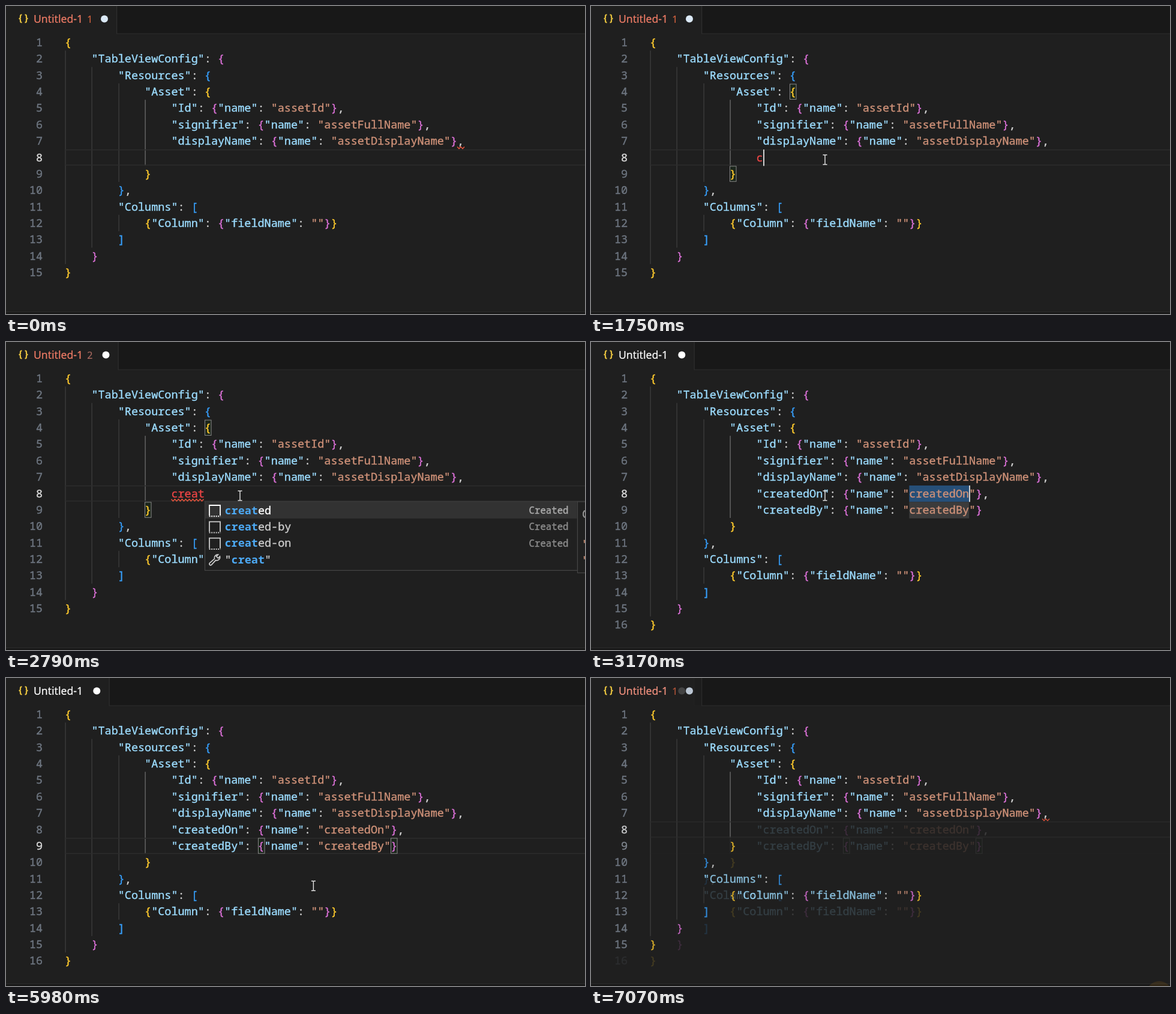
These frames come from a looping animation (965x513 px, 7.14 s). An HTML page:

```html
<!DOCTYPE html>
<html lang="en">
<head>
<meta charset="utf-8">
<title>Snippet completion</title>
<style>
html, body { margin: 0; height: 100%; overflow: hidden; background: #1f1f1f; }
svg { display: block; width: 100vw; height: 100vh; }
text { white-space: pre; font: 18.473px "Noto Sans Mono", monospace; color: #d2d2d2; }
text, tspan { fill: currentColor; stroke: currentColor; stroke-width: .4px; }
.ui { font: 17.6px "Noto Sans", sans-serif; stroke-width: .2px; }
.key { color: #9cdcfe; }
.str { color: #ce9178; }
.bad { color: #ec4545; }
.b0 { color: #ffcb2d; }
.b1 { color: #da70d6; }
.b2 { color: #369df8; }
.hit { color: #4daaf5; font-weight: 700; stroke: none; }
.line { fill: none; stroke-width: 1.4; }
</style>
</head>
<body>
<svg viewBox="0 0 965 513"><g id="now"></g><g id="next"></g></svg>
<script>
const LOOP = 7140, CHAR = 11.084, ROW = 27.36, BASE = 19.5;
const colX = c => 98.1 + c * CHAR;
const rowY = r => 47.5 + r * ROW;

const head = [
  '{',
  '    "TableViewConfig": {',
  '        "Resources": {',
  '            "Asset": {',
  '                "Id": {"name": "assetId"},',
  '                "signifier": {"name": "assetFullName"},',
  '                "displayName": {"name": "assetDisplayName"},'
];
const inserted = [
  '                "createdOn": {"name": "createdOn"},',
  '                "createdBy": {"name": "createdBy"}'
];
const tail = [
  '            }',
  '        },',
  '        "Columns": [',
  '            {"Column": {"fieldName": ""}}',
  '        ]',
  '    }',
  '}'
];

// Each cue changes part of the editor state from its time on.
const cues = [
  [0, { tab: 1, word: '', popup: '', row: 7, col: 16, caret: false, done: false, select: false, match: null, ring: null }],
  [970, { caret: true, ring: [390, 256] }],
  [1030, { match: [[3, 21], [8, 12]] }],
  [1090, { ring: null }],
  [1520, { caret: false }],
  [1720, { caret: true, word: 'c', col: 17 }],
  [1790, { tab: 2 }],
  [1850, { popup: 'c' }],
  [2010, { word: 'cr', col: 18 }],
  [2050, { popup: 'cr' }],
  [2120, { word: 'cre', popup: 'cre', col: 19 }],
  [2190, { word: 'crea', popup: 'crea', col: 20 }],
  [2290, { word: 'creat', col: 21 }],
  [2320, { popup: 'creat' }],
  [2790, { caret: false }],
  [3050, { caret: true, popup: '', done: true, select: true, match: null, col: 48 }],
  [3170, { tab: 0 }],
  [3530, { caret: false }],
  [4040, { caret: true, row: 8 }],
  [4240, { select: false, col: 50 }],
  [4270, { match: [[8, 29], [8, 49]] }],
  [4730, { caret: false }],
  [5220, { caret: true }],
  [5700, { caret: false }],
  [6200, { caret: true }],
  [6700, { caret: false, ring: [947, 527] }]
];
const stateAt = t => Object.assign({}, ...cues.filter(c => c[0] <= t).map(c => c[1]));

const rect = (x, y, w, h, fill, more = '') =>
  `<rect x="${x}" y="${y}" width="${w}" height="${h}" fill="${fill}" ${more}/>`;
const text = (x, y, body, more = '') => `<text x="${x}" y="${y}" ${more}>${body}</text>`;
const path = (d, stroke, more = '') => `<path class="line" d="${d}" stroke="${stroke}" ${more}/>`;
const span = (cls, body) => `<tspan class="${cls}">${body}</tspan>`;

function code(lines) {
  let depth = 0;
  const paint = (token, string, colon, open, close, word) =>
    string ? span(colon === undefined ? 'str' : 'key', string) + (colon || '')
    : open ? span('b' + depth++ % 3, open)
    : close ? span('b' + --depth % 3, close)
    : span('bad', word);
  return lines.map((line, r) => {
    const body = line.trimStart();
    const marked = body.replace(/("[^"]*")(:)?|([{[])|([}\]])|([a-z]+)/g, paint);
    return text(colX(line.length - body.length), rowY(r) + BASE, marked);
  }).join('');
}

function guides(extra) {
  const guide = (col, from, to, color = '#404040') =>
    rect(Math.round(colX(col)) + 0.5, rowY(from) - 0.7, 1.2, (to - from + 1) * ROW, color);
  return guide(0, 1, 13 + extra) + guide(4, 2, 12 + extra) + guide(8, 3, 8 + extra) +
    guide(8, 11 + extra, 11 + extra) + guide(12, 4, 7 + extra, '#747474');
}

function squiggle(row, col, chars) {
  const x = colX(col), steps = Math.round(chars * CHAR / 3);
  let d = '';
  for (let i = 0; i <= steps; i++) {
    d += `${i ? 'L' : 'M'}${x + i * 3} ${rowY(row) + ROW - 3 + (i % 2 ? 1.6 : -1.6)}`;
  }
  return path(d, '#f0583f');
}

function tabBar(tab) {
  const [edge, dot] = [[172, 151.3], [184.5, 164], [187, 166.5]][tab];
  const tone = tab ? '#f07c66' : '#fff';
  const brace = 'M5 0Q2.5 0 2.5 2.5V4.5Q2.5 6.5 0 6.5Q2.5 6.5 2.5 8.5V10.5Q2.5 13 5 13';
  return rect(0, 0, 965, 46, '#181818') + rect(0, 45.5, 965, 1.2, '#2b2b2b') +
    rect(0, 0, edge, 47, '#1f1f1f') + rect(edge - 0.5, 0, 1.2, 46.5, '#2f2f2f') +
    path(brace, '#e3bf3e', 'transform="translate(21.5 14.5)" style="stroke-width:2.2"') +
    path(brace, '#e3bf3e', 'transform="translate(36.5 14.5) scale(-1 1)" style="stroke-width:2.2"') +
    text(46, 28, 'Untitled-1', `class="ui" style="color:${tone}"`) +
    (tab ? text(135.3, 28, tab, `class="ui" style="font-size:16px;color:${tab === 1 ? '#d4623f' : '#a96a60'}"`) : '') +
    `<circle cx="${dot}" cy="21.5" r="6" fill="${tab === 1 ? '#dbe9f8' : '#fff'}"/>`;
}

function popup(word) {
  const x = Math.round(colX(16 + word.length)), top = 266;
  const items = [['created', 'Created'], ['created-by', 'Created'], ['created-on', 'Created']];
  if (word === 'c') {
    items.push(...['column', 'columns', 'complex', 'condition', 'count'].map(n => [n, n[0].toUpperCase() + n.slice(1)]));
  }
  items.push([`"${word}"`, '']);
  const frame = 'stroke="#454545" stroke-width="1.2"';
  const rows = items.map(([name, label], i) => {
    const y = top + 1 + i * ROW, tone = i ? '#ccc' : '#fff';
    const icon = label
      ? path('M0 17V0H18V17', tone, `transform="translate(${x + 8} ${y + 5})" style="stroke-width:1.8"`) +
        path('M0 18.2H19', tone, `transform="translate(${x + 7.5} ${y + 5})" stroke-dasharray="2 1.7" style="stroke-width:2"`)
      : path('M2 15L10 8A5.5 5.5 0 0 1 16 1L13 4L16 7L19 4A5.5 5.5 0 0 1 12 10.5L5 18A2 2 0 0 1 2 15Z',
        tone, `transform="translate(${x + 6.5} ${y + 4})" style="stroke-width:1.7"`);
    return (i ? '' : rect(x + 0.6, y - 0.4, 620, ROW, '#323232')) + icon +
      text(x + 33.5, y + BASE, name.replace(word, span('hit', word)), `style="color:${tone}"`) +
      text(x + 606.5, y + 19, label, `text-anchor="end" style="font-size:15.7px;color:${i ? '#8c8c8c' : '#adadad'}"`);
  }).join('');
  const side = x + 621;
  return rect(x + 0.5, top, 621, items.length * ROW + 5, '#202020', frame) + rows +
    rect(side + 0.5, top, 400, 118.5, '#202020', frame) +
    text(side + 8, 293, 'Created', 'style="color:#999"') +
    text(side + 8, 343, '"createdOn"', 'class="str"') +
    text(side + 8, 370, '"createdBy"', 'class="str"');
}

function pointerAt(t) {
  if (t < 450 || t >= 6290) return null;
  if (t < 5850) {
    const left = (1 - Math.min(1, Math.floor((t - 450) / 32) / 10)) ** 1.6;
    return [390 + 432 * left, 256 + 211 * left];
  }
  const p = Math.min(1, (Math.floor((t - 5850) / 31.5) + 1) / 14);
  return [390 + 421 * p ** 1.2, 256 + 266 * p ** 1.05];
}

function scene(t) {
  const s = stateAt(t), pointer = pointerAt(t);
  const middle = s.done ? inserted : [' '.repeat(16) + s.word];
  const lines = [...head, ...middle, ...tail];
  const y = rowY(s.row);
  let out = rect(0, 0, 965, 513, '#1f1f1f') + tabBar(s.tab) + guides(s.done ? 1 : 0);

  if (s.select) {
    for (const row of [7, 8]) {
      out += rect(colX(39), rowY(row), 9 * CHAR, ROW, row === s.row ? '#264f78' : '#3b3b3b');
    }
  } else {
    out += rect(98.5, y + 0.6, 870, ROW - 2, 'none', 'stroke="#2c2c2c" stroke-width="1.5"');
  }
  for (const [row, col] of s.match || []) {
    out += rect(Math.round(colX(col)) + 0.5, rowY(row) + 0.5, 10.5, ROW - 2, '#1c261c', 'stroke="#888"');
  }
  out += lines.map((_, r) => text(61, rowY(r) + BASE, r + 1,
    `text-anchor="end" style="color:${r === s.row ? '#dcdcdc' : '#6e7681'}"`)).join('');
  out += code(lines);
  if (s.tab === 1 && !s.word) out += squiggle(6, 59, 1);
  if (s.tab === 2 && !s.done) out += squiggle(7, 16, s.word.length);
  if (s.caret) out += rect(Math.round(colX(s.col)), Math.round(y), 2, ROW, '#d0d0d0');
  out += rect(0, 509.5, 965, 4, '#181818') + rect(0, 509, 965, 1, '#2b2b2b');
  if (s.popup) out += popup(s.popup);
  if (s.ring) out += `<circle cx="${s.ring[0]}" cy="${s.ring[1]}" r="22" fill="#e69614" opacity=".75"/>`;
  if (pointer) {
    out += path('M-3.5 -8H-1Q0 -8 0 -7Q0 -8 1 -8H3.5M0 -7V7M-3.5 8H-1Q0 8 0 7Q0 8 1 8H3.5',
      '#e4e4e4', `transform="translate(${pointer})"`);
  }
  return out;
}

const now = document.getElementById('now'), next = document.getElementById('next');
next.innerHTML = scene(0);
let shown = '';

function tick() {
  const t = performance.now() % LOOP;
  const fade = t < 6790 ? 0 : Math.min(5, Math.floor((t - 6790) / 70) + 1) / 6;
  const picture = scene(t);
  if (picture !== shown) now.innerHTML = shown = picture;
  next.setAttribute('opacity', fade);
  requestAnimationFrame(tick);
}
tick();
</script>
</body>
</html>
```
